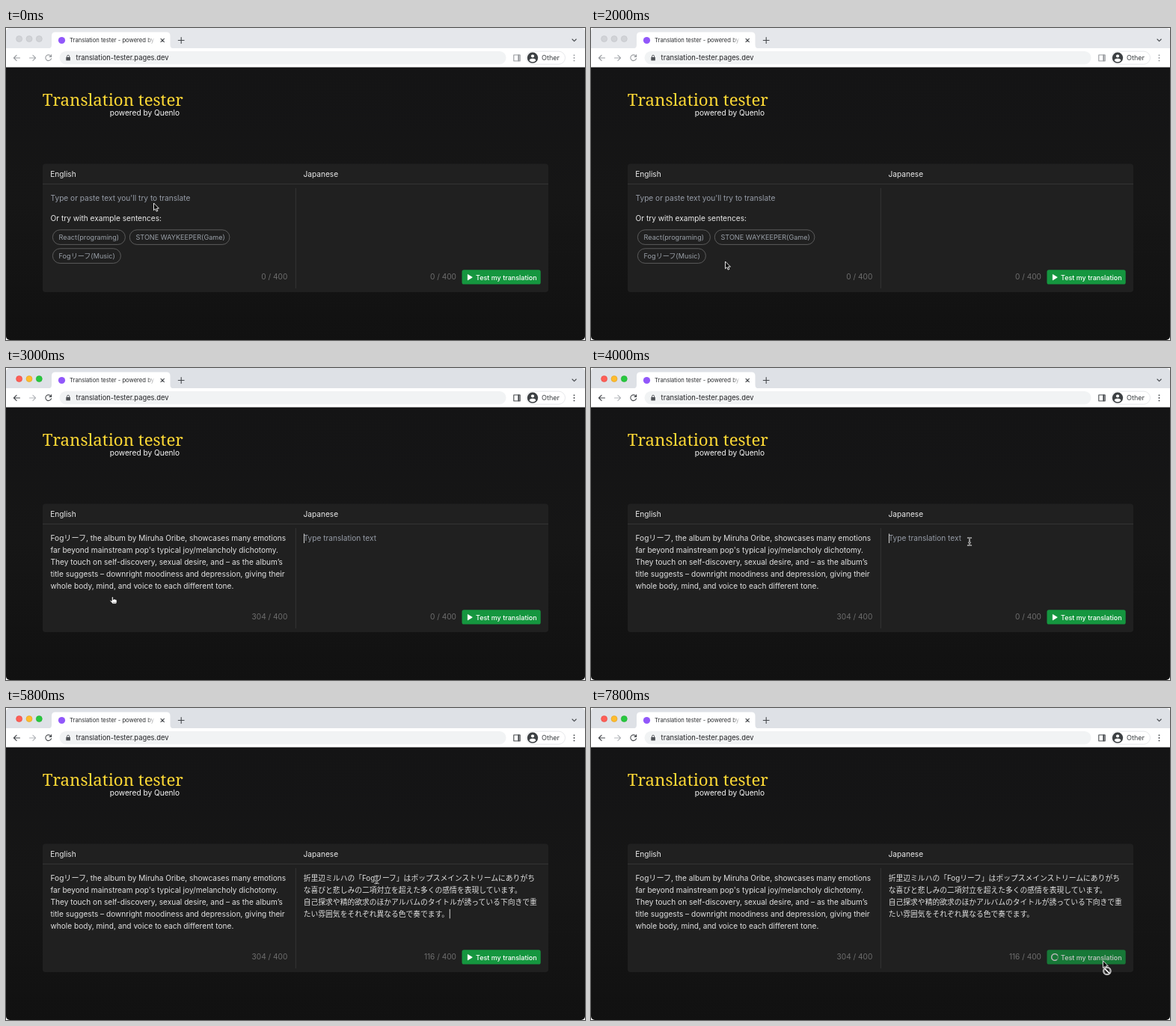
Recreate the animation shown at these times as an HTML page. Size 774 by 417 pixels, loop 8000 ms.

```html
<!DOCTYPE html>
<html lang="en">
<head>
<meta charset="utf-8">
<title>Translation tester</title>
<style>
  html, body { margin: 0; width: 100%; height: 100%; overflow: hidden; background: #fff; }
  svg { display: block; width: 100%; height: 100%; }
  text { font: 10.12px Inter, "Noto Sans CJK JP", "Noto Sans CJK", sans-serif; white-space: pre; }
  .title { font: 22.28px "Noto Serif", serif; fill: #fdd835; }
  .tab { font-size: 7.65px; fill: #2b2d30; }
  .url { font-size: 9.33px; fill: #202124; }
  .user { font-size: 9.1px; fill: #3c4043; }
  .head { fill: #eaeaea; }
  .body { fill: #e2e2e2; }
  .jp { font-size: 9.78px; fill: #e2e2e2; }
  .hint { fill: #969ca7; }
  .count { fill: #6e6e6e; text-anchor: end; }
  .chip rect { fill: none; stroke: #6a6a6a; stroke-width: .8; }
  .chip text { font-size: 9.1px; fill: #9aa0a8; }
  .label { font-size: 9px; font-weight: 500; fill: #fff; }
  .line { fill: none; stroke-linecap: round; stroke-linejoin: round; }
</style>
</head>
<body>
<svg viewBox="0 0 774 417" preserveAspectRatio="none">
  <defs>
    <linearGradient id="page" x2="0" y2="1">
      <stop stop-color="#141415"/><stop offset=".5" stop-color="#161616"/><stop offset="1" stop-color="#111"/>
    </linearGradient>
    <linearGradient id="fade" gradientUnits="userSpaceOnUse" x1="188" x2="200">
      <stop stop-color="#fff" stop-opacity="0"/><stop offset="1" stop-color="#fff"/>
    </linearGradient>
    <clipPath id="window"><rect width="774" height="417" rx="5"/></clipPath>
    <path id="pointer" d="M0 0v9.700l2.200-2 1.500 3.400 1.600-.7-1.500-3.300h3.100z" fill="#000" stroke="#fff" stroke-width=".9"/>
    <path id="stem" d="M-2.300-5Q0-5 0-3.600 0-5 2.300-5M0-3.600v7.200M-2.300 5Q0 5 0 3.600 0 5 2.300 5M-1.200 1.300h2.400"/>
  </defs>

  <g clip-path="url(#window)">
    <rect id="strip" width="774" height="28"/>
    <g id="lights" stroke-width=".6">
      <circle cx="17.600" cy="14.500" r="4"/><circle cx="31" cy="14.500" r="4"/><circle cx="44.300" cy="14.500" r="4"/>
    </g>
    <path d="M56 27.500q5 0 5-5V10.500q0-5 5-5h148.500q5 0 5 5v12q0 5 5 5z" fill="#fff"/>
    <circle cx="74.500" cy="16.500" r="4.600" fill="#9157fa"/>
    <text class="tab" x="85" y="19.300">Translation tester - powered by</text>
    <rect x="188" y="9" width="14" height="15" fill="url(#fade)"/>
    <path class="line" stroke="#45484c" d="M207 14.300l4.400 4.400m0-4.400l-4.400 4.400M230.300 16.500h7.800M234.200 12.600v7.800M757 15l2.600 2.600 2.600-2.600" stroke-width="1.1"/>

    <rect y="27" width="774" height="26" fill="#fff"/>
    <rect x="71.500" y="31" width="597" height="17.500" rx="8.750" fill="#f1f3f4"/>
    <path id="forward" class="line" d="M31.500 40h8m-3.600-3.700 3.700 3.700-3.700 3.700" stroke-width="1.1"/>
    <g id="icons" class="line" stroke-width="1.1">
      <path d="M18.500 40h-8m3.600-3.700L10.400 40l3.700 3.700"/>
      <path d="M59.800 37.300a3.900 3.900 0 1 0 .7 3.600M60.600 35.800v2.600h-2.600"/>
      <path d="M678.800 36h8.400v8h-8.400z"/>
      <path d="M685.300 36.500v7" stroke-width="2"/>
      <path d="M759.500 36.400v.01M759.500 40v.01M759.500 43.600v.01" stroke-width="1.900"/>
    </g>
    <rect x="80.300" y="39" width="5.600" height="4.600" rx=".6" fill="#505357"/>
    <path class="line" d="M81.600 39v-1.200a1.500 1.500 0 0 1 3 0V39" stroke="#505357" stroke-width=".9"/>
    <text class="url" x="93.600" y="43">translation-tester.pages.dev</text>
    <rect x="695.500" y="31.200" width="52" height="17.200" rx="8.600" fill="#fff" stroke="#e1e3e6" stroke-width=".8"/>
    <circle cx="704" cy="39.800" r="7.200" fill="#3c4043"/>
    <circle cx="704" cy="37.500" r="2.100" fill="#fff"/>
    <path d="M699.700 43.500q0-2.700 4.300-2.700t4.300 2.700q-1.700 2.100-4.300 2.100t-4.300-2.100z" fill="#fff"/>
    <text class="user" x="716" y="43">Other</text>

    <rect y="52.500" width="774" height="364.500" fill="url(#page)"/>
    <text class="title" x="48.800" y="103.500">Translation tester</text>
    <text x="138.800" y="117" fill="#f8f8f8">powered by Quenlo</text>

    <rect x="49" y="181.500" width="676" height="171.500" rx="4" fill="#202020"/>
    <path d="M49 208.500h676M387.300 214v134" stroke="#373737" stroke-width=".9"/>
    <text class="head" x="59.200" y="198.900">English</text>
    <text class="head" x="397.600" y="198.900">Japanese</text>

    <g id="examples">
      <text class="hint" x="59.600" y="231.400">Type or paste text you'll try to translate</text>
      <text class="head" x="59.600" y="257.600">Or try with example sentences:</text>
    </g>
    <g id="english"></g>
    <text id="hint" class="hint" x="397.700" y="231.400">Type translation text</text>
    <g id="japanese"></g>
    <rect id="caret" width=".9" height="12.500" fill="#e8e8e8"/>
    <text id="countL" class="count" x="376.300" y="335.500"></text>
    <text id="countR" class="count" x="602" y="335.500"></text>

    <g id="button">
      <rect x="609.500" y="323.200" width="105.200" height="19.400" rx="2.700" fill="#15963f"/>
      <path id="play" d="M617.300 329.500v7.400l6-3.700z" fill="#fff" stroke="#fff" stroke-width=".8" stroke-linejoin="round"/>
      <g id="spinner" class="line" stroke-width="1.300">
        <circle r="4.400" stroke="#a9b5ad" stroke-opacity=".7"/>
        <path d="M0-4.400A4.400 4.400 0 1 1-4.400 0" stroke="#eee"/>
      </g>
      <text class="label" x="628" y="336.500">Test my translation</text>
    </g>
  </g>

  <g id="cursor">
    <use id="arrow" href="#pointer"/>
    <g id="hand">
      <path d="M-1 .8q1-1.300 2 0v3.400l.3-.7q1-.7 1.500.3l.4-.2q1-.4 1.400.6 1.300-.4 1.300 1v1.600q0 1.500-.9 3H.100q-.6-1.300-2-2.500-2-1.700-1.800-2.300.5-1 2.700.9z" fill="#fff" stroke="#000" stroke-width=".7"/>
      <path d="M1.300 7.200v1.600m1.300-1.600v1.600m1.300-1.600v1.600" stroke="#000" stroke-width=".4"/>
    </g>
    <g id="beam" class="line">
      <use href="#stem" stroke="#e4e4e4" stroke-width="1.700"/>
      <use href="#stem" stroke="#222" stroke-width=".6"/>
    </g>
    <g id="blocked">
      <use href="#pointer"/>
      <circle cx="5.500" cy="13.700" r="4.700" fill="#222" stroke="#fff" stroke-width="2"/>
      <circle cx="5.500" cy="13.700" r="4.700" fill="none" stroke="#222" stroke-width=".5"/>
      <path d="M2.400 10.600l6.200 6.200" stroke="#fff" stroke-width="1.500"/>
    </g>
  </g>
</svg>
<script>
const LOOP = 8000, STEP = 200;
const ACTIVATE = 2400, FILL = 2600, PASTE = 5800, SUBMIT = 7400;
const $ = id => document.getElementById(id);
const show = (id, on) => { $(id).style.display = on ? '' : 'none'; };

const english = [
  'Fogリーフ, the album by Miruha Oribe, showcases many emotions',
  "far beyond mainstream pop's typical joy/melancholy dichotomy.",
  'They touch on self-discovery, sexual desire, and – as the album’s',
  'title suggests – downright moodiness and depression, giving their',
  'whole body, mind, and voice to each different tone.'
];
const japanese = [
  '折里辺ミルハの「Fogリーフ」はポップスメインストリームにありがち',
  'な喜びと悲しみの二項対立を超えた多くの感情を表現しています。',
  '自己探求や精的欲求のほかアルバムのタイトルが誘っている下向きで重',
  'たい雰囲気をそれぞれ異なる色で奏でます。'
];
const chips = [
  [62.4, 269.8, 97, 'React(programing)'],
  [165.3, 269.8, 133.6, 'STONE WAYKEEPER(Game)'],
  [62.4, 294.8, 91, 'Fogリーフ(Music)']
];

const paragraph = (lines, x, cls) => lines.map((s, i) =>
  `<text class="${cls}" x="${x}" y="${231.4 + i * 15.87}">${s}</text>`).join('');
$('english').innerHTML = paragraph(english, 59.5, 'body');
$('japanese').innerHTML = paragraph(japanese, 397.8, 'jp');
$('examples').innerHTML += chips.map(([x, y, w, s]) =>
  `<g class="chip"><rect x="${x}" y="${y}" width="${w}" height="19.6" rx="9.8"/>` +
  `<text x="${x + 8.2}" y="${y + 13.1}">${s}</text></g>`).join('');

// Pointer stops: time, x, y
const stops = [
  [0, 197.5, 234], [600, 197.5, 234], [1800, 179.5, 312], [2000, 179.5, 312],
  [2400, 142.3, 305.5], [3200, 142.3, 305.5], [3800, 506, 232], [4800, 506, 232],
  [5400, 495.5, 229.5], [5800, 495.5, 229.5], [6600, 685, 339], [7200, 685, 339],
  [7400, 684.4, 337.8], [8000, 684.4, 337.8]
];

function pointer(t) {
  const i = stops.findIndex(s => s[0] > t);
  const [t0, x0, y0] = stops[i - 1], [t1, x1, y1] = stops[i];
  const u = (t - t0) / (t1 - t0), e = u * u * (3 - 2 * u);
  return [x0 + (x1 - x0) * e, y0 + (y1 - y0) * e];
}

function pointerKind(t, x) {
  if (t < 2200) return 'arrow';
  if (t >= SUBMIT) return 'blocked';
  return t < 3400 || x > 609 ? 'hand' : 'beam';
}

function render(t) {
  const active = t >= ACTIVATE, filled = t >= FILL, pasted = t >= PASTE, busy = t >= SUBMIT;

  $('strip').setAttribute('fill', active ? '#dee1e6' : '#e5e7eb');
  $('icons').setAttribute('stroke', active ? '#45484c' : '#96999d');
  $('forward').setAttribute('stroke', active ? '#b4b7bb' : '#a6a9ad');
  [...$('lights').children].forEach((c, i) => {
    c.setAttribute('fill', active ? ['#fe5f57', '#febc2e', '#28c840'][i] : '#d1d3d7');
    c.setAttribute('stroke', active ? ['#e2463f', '#dfa023', '#1dad2b'][i] : '#c0c2c6');
  });

  show('examples', !filled);
  show('english', filled);
  show('hint', filled && !pasted);
  show('japanese', pasted);
  $('countL').textContent = (filled ? 304 : 0) + ' / 400';
  $('countR').textContent = (pasted ? 116 : 0) + ' / 400';

  const since = t - (pasted ? PASTE : FILL);
  show('caret', filled && !busy && since % 1000 < 500);
  $('caret').setAttribute('x', pasted ? 592.8 : 398);
  $('caret').setAttribute('y', pasted ? 268.8 : 221.5);

  show('play', !busy);
  show('spinner', busy);
  $('button').setAttribute('opacity', busy ? .75 : 1);
  $('spinner').setAttribute('transform', `translate(620 333) rotate(${(t - SUBMIT) * .36})`);

  const [x, y] = pointer(t), kind = pointerKind(t, x);
  $('cursor').setAttribute('transform', `translate(${x} ${y})`);
  for (const k of ['arrow', 'hand', 'beam', 'blocked']) show(k, k === kind);
}

const start = performance.now();
function tick() {
  const t = (performance.now() - start) % LOOP;
  render(Math.floor(t / STEP) * STEP);
  requestAnimationFrame(tick);
}
tick();
</script>
</body>
</html>
```
